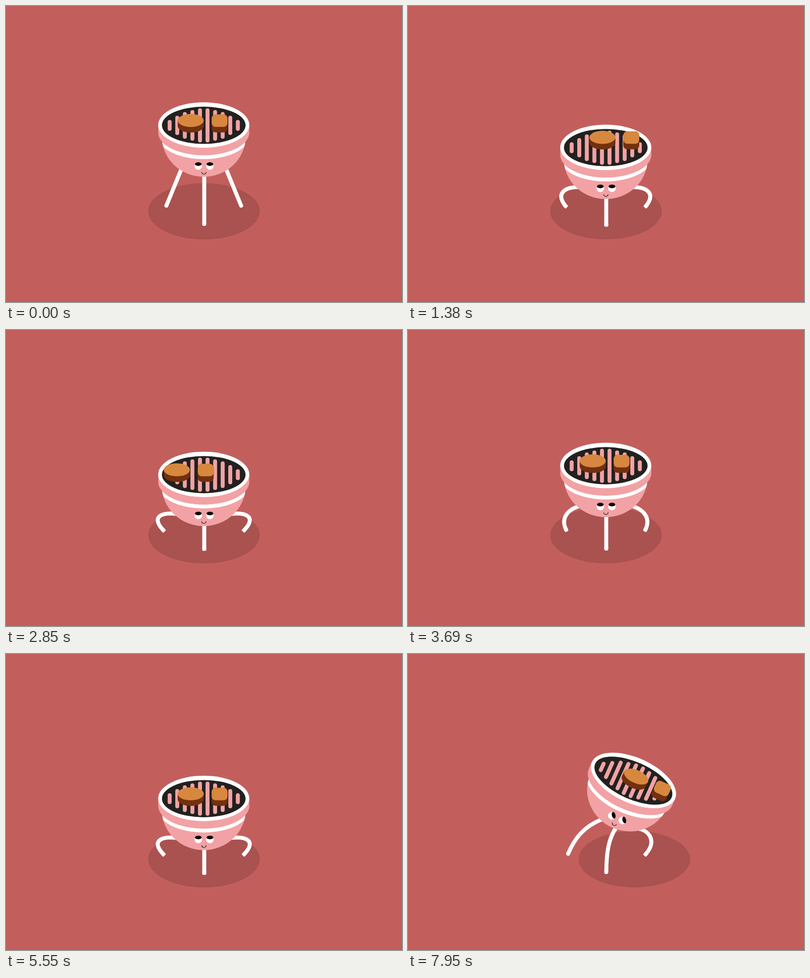
An HTML page with a canvas for the animation above (8 s loop, 800 by 600 pixels).

```html
<!DOCTYPE html>
<html lang="en">
<head>
<meta charset="utf-8">
<title>Dancing grill</title>
<style>
  html, body { margin: 0; width: 100%; height: 100%; overflow: hidden; background: #c25f5c; }
  canvas { display: block; width: 800px; height: 600px; }
</style>
</head>
<body>
<canvas id="stage" width="800" height="600"></canvas>
<script>
const ctx = document.getElementById('stage').getContext('2d');
const LOOP = 8000, TICK = 30, BEAT = 15, AXIS = 399.5, SLIDE = 28;
const C = {
  bg: '#c25f5c', shadow: '#a95250', pink: '#f2a2a4', white: '#ffffff',
  coal: '#21211f', top: '#d8873f', side: '#73300d', ink: '#0c0808'
};

// Leg: hip, two control points, foot tip, foot corner radius
const mirrorLeg = l => l.map((v, i) => i < 8 && i % 2 === 0 ? 2 * AXIS - v : v);
const stand = [357, 324, 345.5, 352, 334, 380, 322.5, 408.5, 4];
const squat = [346, 373, 312, 368.5, 293, 380, 320.5, 408.5, 1.5];

const up = {
  x: AXIS, y: 241.3, tilt: 0, shade: 400, gaze: -90,
  legs: [stand, [400.5, 338, 400.5, 375, 400.5, 410, 400.5, 446, 4], mirrorLeg(stand)]
};
const down = {
  x: AXIS, y: 292.7, tilt: 0, shade: 400, gaze: -90,
  legs: [squat, [400.5, 388, 400.5, 405, 400.5, 425, 400.5, 447.5, 1.5], mirrorLeg(squat)]
};
const right = {
  x: 455.5, y: 256.3, tilt: 24, shade: 457.5, gaze: -38,
  legs: [
    [392, 335, 354, 350, 336, 375, 322, 408.5, 3.5],
    [422, 350, 404, 374, 401, 405, 400.5, 446, 3.5],
    [460, 353, 487, 356, 504, 378, 477.5, 409, 2]
  ]
};
const left = {
  x: 2 * AXIS - right.x, y: right.y, tilt: -right.tilt, shade: 800 - right.shade,
  gaze: -180 - right.gaze, legs: right.legs.map(mirrorLeg).reverse()
};

// One pose per beat; every beat moves on from the one before
const poses = [down, right, down, up, down, left, down, up];

const RISE = [0, .12, .5, .8, .92, .965, .982, .991, .996, .999, 1];
const TOSS_X = [0, .3, .62, .92, 1.07, 1.08, 1.06, 1.03, 1.01, 1, 1];
const TOSS_Y = [0, 11, 18, 22, 22, 20, 16, 11, 6, 2, 0];
const HOP_X = [0, .03, .1, .2, .32, .48, .66, .82, .93, .98, 1];
const HOP_Y = [0, 3, 15, 28, 34, 32, 25, 16, 8, 2, 0];

const mix = (a, b, p) => a + (b - a) * p;
function at(table, k) {
  const i = Math.min(k, table.length - 1), n = Math.floor(i);
  return mix(table[n], table[Math.min(n + 1, table.length - 1)], i - n);
}

function poseAt(beat, k) {
  const a = poses[(beat + 7) % 8], b = poses[beat];
  const s = Math.min(1, k / 5);
  const drop = beat % 2 === 0;
  const p = drop ? s * s * (3 - 2 * s) : at(RISE, k);
  const turn = drop ? .6 * p + .4 * s : p;
  return {
    x: mix(a.x, b.x, p), y: mix(a.y, b.y, p), shade: mix(a.shade, b.shade, p),
    tilt: mix(a.tilt, b.tilt, turn), gaze: mix(a.gaze, b.gaze, turn),
    legs: a.legs.map((l, i) => l.map((v, j) => mix(v, b.legs[i][j], p)))
  };
}

// Where the food sits on the grill: [slide, lift]
function foodAt(beat, k) {
  switch (beat) {
    case 1: return [SLIDE * at(HOP_X, k), at(HOP_Y, k)];
    case 2: return [SLIDE, 0];
    case 3: {
      const q = k < 5 ? k : 5 + (k - 5) * 5 / 9;
      return [SLIDE * (1 - at(TOSS_X, q)), at(TOSS_Y, q)];
    }
    case 5: return [-SLIDE * at(RISE, k), 0];
    case 6: return [-SLIDE, 0];
    case 7: return [-SLIDE * (1 - at(TOSS_X, k)), at(TOSS_Y, k)];
  }
  return [0, 0];
}

function oval(x, y, rx, ry, fill, turn = 0) {
  ctx.beginPath();
  ctx.ellipse(x, y, rx, ry, turn, 0, 2 * Math.PI);
  ctx.fillStyle = fill;
  ctx.fill();
}
function box(x, y, w, h, r, fill) {
  ctx.beginPath();
  ctx.roundRect(x, y, w, h, r);
  ctx.fillStyle = fill;
  ctx.fill();
}

function drawLeg([x0, y0, x1, y1, x2, y2, x3, y3, r]) {
  const dir = Math.atan2(y3 - y2, x3 - x2);
  const ex = x3 - 4 * Math.cos(dir), ey = y3 - 4 * Math.sin(dir);
  ctx.beginPath();
  ctx.moveTo(x0, y0);
  ctx.bezierCurveTo(x1, y1, x2, y2, ex, ey);
  ctx.strokeStyle = C.white;
  ctx.lineWidth = 8;
  ctx.lineCap = 'butt';
  ctx.stroke();
  ctx.save();
  ctx.translate(ex, ey);
  ctx.rotate(dir);
  box(-4, -4, 8, 8, r, C.white);
  ctx.restore();
}

// Everything on the bowl is measured from the centre of the rim
function drawBowl() {
  ctx.save();
  ctx.beginPath();
  ctx.ellipse(0, 24, 84.5, 80.8, 0, 0, Math.PI);
  ctx.closePath();
  ctx.fillStyle = C.pink;
  ctx.fill();
  ctx.clip();
  oval(0, 23, 92, 46, C.white);
  ctx.restore();

  ctx.beginPath();
  ctx.ellipse(0, 15.3, 92, 46, 0, 0, Math.PI);
  ctx.lineTo(-92, 0);
  ctx.lineTo(92, 0);
  ctx.closePath();
  ctx.fillStyle = C.pink;
  ctx.fill();

  oval(0, 0, 92, 46, C.white);
  oval(0, .5, 84.5, 37.8, C.coal);
  [34.5, 31, 27, 19.5, 11].forEach((h, i) => {
    const x = 7.65 + 15.3 * i;
    for (const s of [-1, 1]) box(s * x - 4, .6 - h, 8, 2 * h, 4, C.pink);
  });
}

function drawFood(slide, lift) {
  ctx.save();
  ctx.translate(slide, -lift);
  oval(-26.3, 2, 26.3, 13.2, C.side);
  box(-52.6, -9.3, 52.6, 11.3, 0, C.side);
  oval(-26.3, -9.3, 26.3, 13.2, C.top);
  box(16, -21.5, 32, 36.5, 8, C.side);
  box(16, -21.5, 32, 25.3, 8, C.top);
  ctx.restore();
}

function drawFace(gaze) {
  const g = gaze * Math.PI / 180;
  for (const x of [-11, 12.5]) {
    oval(x, 83.2, 7.6, 7.6, C.white);
    oval(x + 4 * Math.cos(g), 83.2 + 4 * Math.sin(g), 3.7, 6.8, C.ink, g);
  }
  ctx.beginPath();
  ctx.arc(.3, 95, 4.5, .1, Math.PI - .1);
  ctx.strokeStyle = C.ink;
  ctx.lineWidth = 1.1;
  ctx.lineCap = 'round';
  ctx.stroke();
}

function draw(ms) {
  const tick = Math.floor((ms % LOOP) / TICK + 1e-6);
  const beat = Math.floor(tick / BEAT) % 8, k = tick % BEAT;
  const pose = poseAt(beat, k);

  ctx.fillStyle = C.bg;
  ctx.fillRect(0, 0, 800, 600);
  oval(pose.shade, 416, 112.8, 57, C.shadow);
  pose.legs.forEach(drawLeg);

  ctx.save();
  ctx.translate(pose.x, pose.y);
  ctx.rotate(pose.tilt * Math.PI / 180);
  drawBowl();
  drawFood(...foodAt(beat, k));
  drawFace(pose.gaze);
  ctx.restore();
}

const start = performance.now();
function frame() {
  draw(performance.now() - start);
  requestAnimationFrame(frame);
}
frame();
</script>
</body>
</html>
```
